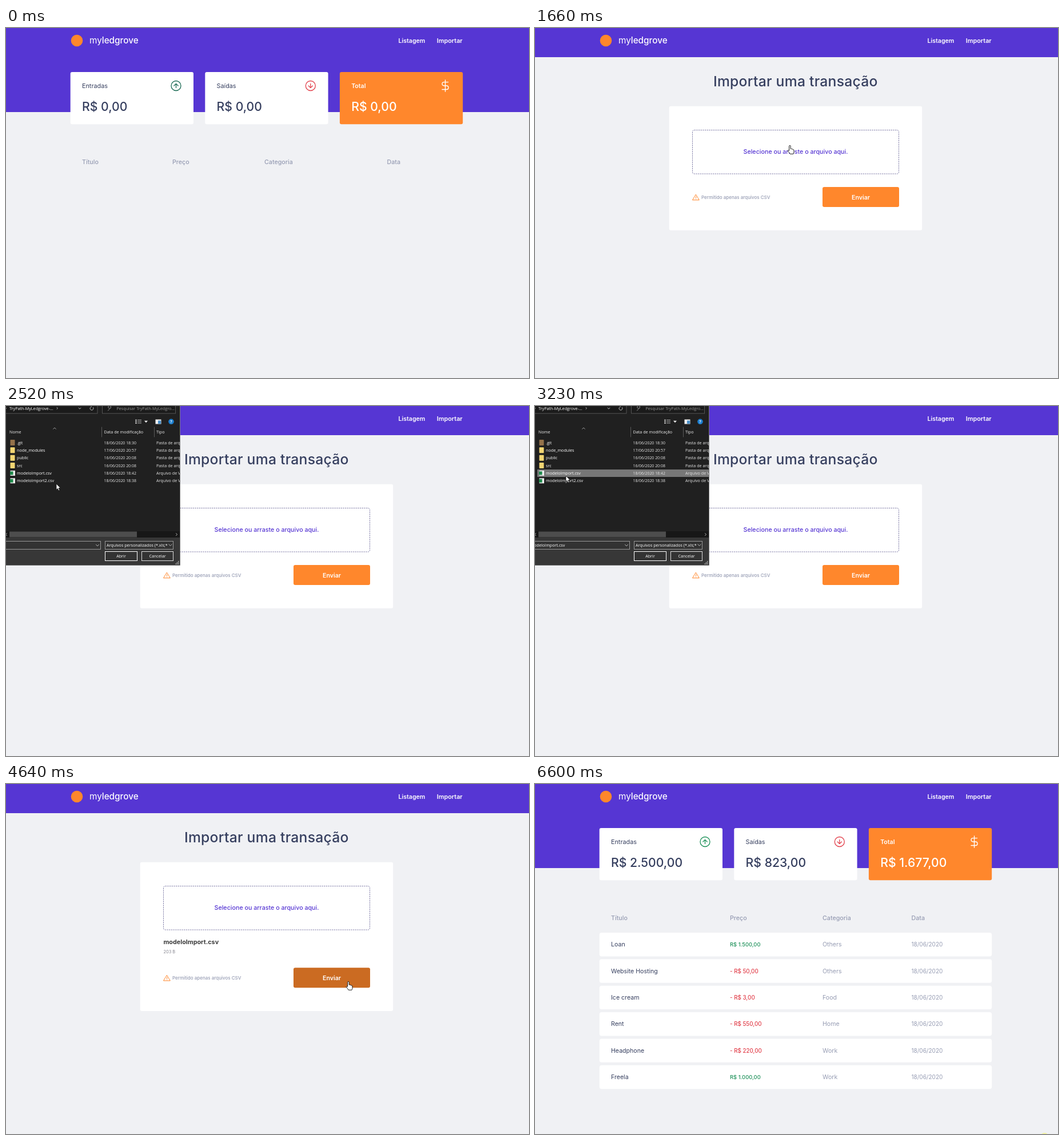
Recreate the animation shown at these times as an HTML page. Size 915 by 612 pixels, loop 6670 ms.

```html
<!DOCTYPE html>
<html lang="pt-BR">
<head>
<meta charset="utf-8">
<title>Importar transações</title>
<style>
  html, body { margin: 0; width: 100%; height: 100%; overflow: hidden; background: #f0f1f4; }
  svg { display: block; width: 915px; height: 612px; }
  text { font-family: Inter, "Open Sans", sans-serif; font-size: 10.6px; white-space: pre; }
  .win text { font-family: "Open Sans", "Noto Sans", sans-serif; font-size: 7.2px; }
  .line { fill: none; stroke-linecap: round; stroke-linejoin: round; }
</style>
</head>
<body>
<svg id="stage" viewBox="0 0 915 612"></svg>
<script>
const LOOP = 6670;
const C = {
  purple: '#5636d3', orange: '#ff872c', ink: '#363f5f', mute: '#969cb3',
  green: '#1d9159', deep: '#1c6b55', red: '#e2414c', white: '#fff'
};

const text = (x, y, s, fill, attrs = '') => `<text x="${x}" y="${y}" fill="${fill}" ${attrs}>${s}</text>`;
const rect = (x, y, w, h, fill, attrs = '') =>
  `<rect x="${x}" y="${y}" width="${w}" height="${h}" fill="${fill}" ${attrs}/>`;
const line = (d, stroke, width = 1, attrs = '') =>
  `<path class="line" d="${d}" stroke="${stroke}" stroke-width="${width}" ${attrs}/>`;
const group = (id, body, attrs = '') => `<g id="${id}" ${attrs}>${body}</g>`;
const size = (px, weight = 400) => `style="font-size:${px}px;font-weight:${weight}"`;
const medium = size(10.7, 500);
const strong = size(10.6, 600);

// Shared header
const header = () =>
  `<circle cx="124" cy="22" r="10.3" fill="${C.orange}"/>` +
  text(146, 26.5, 'my<tspan font-weight="500">ledgrove</tspan>', C.white, size(15.3)) +
  text(686.5, 26, 'Listagem', C.white, strong) +
  text(753.8, 26, 'Importar', C.white, 'id="link" ' + size(10.8, 600));

// Listing page
function arrowIcon(x, color, down) {
  const turn = down ? ' rotate(180)' : '';
  return `<g transform="translate(${x} 101)${turn}">` +
    `<circle r="8.5" fill="none" stroke="${color}" stroke-width="1.3"/>` +
    line('M0 3.6V-3.6M-3.6 0L0 -3.6L3.6 0', color, 1.3) + '</g>';
}

function listing(id, totals, columns, rows, up) {
  const labels = ['Entradas', 'Saídas', 'Total'];
  let out = rect(0, 51, 915, 96, C.purple);
  labels.forEach((label, i) => {
    const x = 112.7 + i * 235.6, last = i === 2, ink = last ? C.white : C.ink;
    out += rect(x, 77, 215.3, 91.3, last ? C.orange : C.white, 'rx="3"') +
      text(x + 20.3, 105, label, ink, last ? strong : size(10.8)) +
      text(x + 20.3, 145, 'R$ ' + totals[i], ink, size(21.2, 500));
  });
  out += arrowIcon(297.5, up, false) + arrowIcon(532.8, C.red, true) +
    line('M12 1V23M17.5 5H9.5a3.5 3.5 0 0 0 0 7h5a3.5 3.5 0 0 1 0 7H6', C.white, 1.5,
      'transform="translate(757.5 90) scale(.92)"');
  ['Título', 'Preço', 'Categoria', 'Data'].forEach((s, i) => {
    out += text(columns[i], 238, s, C.mute, medium);
  });
  rows.forEach(([name, price, kind], i) => {
    const y = 260 + i * 46.35, base = y + 24.4, cost = price[0] === '-';
    out += rect(112.7, y, 686.5, 41.4, C.white, 'rx="4"') +
      text(columns[0], base, name, C.ink) +
      text(columns[1], base, price, cost ? C.red : C.green, size(cost ? 9.8 : 9.4, 500)) +
      text(columns[2], base, kind, C.mute) +
      text(columns[3], base, '18/06/2020', C.mute, size(10));
  });
  return group(id, out);
}

const entries = [
  ['Loan', 'R$ 1.500,00', 'Others'],
  ['Website Hosting', '- R$ 50,00', 'Others'],
  ['Ice cream', '- R$ 3,00', 'Food'],
  ['Rent', '- R$ 550,00', 'Home'],
  ['Headphone', '- R$ 220,00', 'Work'],
  ['Freela', 'R$ 1.000,00', 'Work']
];

// Import page
const importPage = () => group('import',
  text(455.8, 102, 'Importar uma transação', C.ink,
    'text-anchor="middle" style="font-size:24.7px;font-weight:500;letter-spacing:.01em"') +
  rect(234.7, 136.7, 442.5, 217, C.white, 'id="card" rx="3"') +
  rect(275.5, 178.5, 361, 76.5, 'none', 'rx="3" stroke="#807da8" stroke-dasharray="2.4 1.3"') +
  text(456, 220, 'Selecione ou arraste o arquivo aqui.', C.purple, 'text-anchor="middle" ' + medium) +
  group('file',
    text(275.5, 280, 'modeloImport.csv', '#3d3d3d', size(10.8, 700)) +
    text(275.5, 295.5, '203 B', '#85858f', size(7.4))) +
  group('footer',
    group('alert',
      line('M281.6 291.4L287.3 300.8H275.9Z', C.orange) + line('M281.6 294.8V297.4M281.6 299V299.1', C.orange)) +
    text(291, 299, 'Permitido apenas arquivos CSV', C.mute, 'id="note" ' + size(8, 500)) +
    rect(503, 278, 134, 35, C.orange, 'id="send" rx="3"') +
    text(570, 299.8, 'Enviar', C.white, 'text-anchor="middle" ' + strong)));

// File dialog
const panel = '#373737';
const slots = [[-5, 236, 171, 15], [173, 236, 120, 15], [173, 254, 57, 17], [237, 254, 56, 17]];

const blankDialog = () => group('blank',
  rect(0, 0, 304, 278, C.white) +
  rect(6, 219, 223, 11, '#4d4d4d') + rect(229, 219, 64, 11, '#171717') +
  rect(0, 230, 304, 48, panel) + rect(293, 267, 11, 11, C.white) +
  slots.map(s => rect(...s, C.white)).join('') +
  line('M304.5 0V278.5H0', '#888'));

function fileRow(name, date, type, i) {
  const y = 64 + i * 13.35, sheet = i > 3;
  const icon = sheet
    ? rect(7.5, y - 4.5, 8.5, 9, '#eee') + rect(7, y - 3, 5.5, 6, '#1f8a4c')
    : rect(7.5, y - 5, 8, 10, i ? '#f3d673' : '#94724a', 'rx=".8"');
  return icon + text(19, y + 2.6, name, '#fff') +
    text(171.5, y + 2.6, date, '#e4e4e4', 'style="font-size:6.95px"') + text(263, y + 2.6, type, '#e4e4e4');
}

const slotBox = ([x, y, w, h], i) =>
  rect(x + .5, y + .5, w - 1, h - 1, '#333', `stroke="${['#999', '#999', '#fff', '#ddd'][i]}"`);

const dialog = () => group('dialog',
  rect(0, 0, 304, 278, '#202020') +
  rect(-5, -8, 165, 21, '#1b1b1b', 'stroke="#555"') + rect(168.5, -8, 128, 21, '#1b1b1b', 'stroke="#555"') +
  group('place',
    line('M-1 2.5l1.5 1.5l-1.5 1.5M89 2.5l1.5 1.5l-1.5 1.5M127 3.2l2 2l2-2M152.6 2.6a3 3 0 1 1-3-1.4', '#ccc', .9) +
    text(6, 6.5, 'TryPath-MyLedgrove-...', '#fff') +
    text(193.5, 6.5, 'Pesquisar TryPath-MyLedgro...', '#999') +
    line('M183 3.6a2.4 2.4 0 1 0-.1.1M181 5.5L178.5 8', '#aaa', .9)) +
  [0, 1, 2].map(i => rect(226.5, 23.6 + i * 2.7, 2, 2, '#ddd') + rect(230, 24 + i * 2.7, 7, 1, '#aaa')).join('') +
  '<path d="M242 25.8h6l-3 3.4z" fill="#eee"/>' +
  rect(261.5, 23.5, 10, 8, '#eee') + rect(266, 25.5, 5, 5.5, '#4a90c8') +
  '<circle cx="289" cy="27.3" r="4.8" fill="#1c7fd0"/>' +
  text(289, 30, '?', C.white, 'text-anchor="middle" font-weight="700"') +
  line('M167.5 37V54M259.5 37V54', '#5a5a5a') + line('M82.6 40.2L85 38L87.4 40.2', '#bbb', .8) +
  text(6, 48, 'Nome', '#eee') + text(171.5, 48, 'Data de modificação', '#eee') + text(263, 48, 'Tipo', '#eee') +
  rect(4, 111, 300, 13, '#777', 'id="pick"') +
  [
    ['.git', '18/06/2020 18:30'], ['node_modules', '17/06/2020 20:57'],
    ['public', '16/06/2020 20:08'], ['src', '16/06/2020 20:08'],
    ['modeloImport.csv', '18/06/2020 18:42'], ['modeloImport2.csv', '18/06/2020 18:38']
  ].map(([n, d], i) => fileRow(n, d, i > 3 ? 'Arquivo de Valores' : 'Pasta de arquivos', i)).join('') +
  rect(0, 219, 304, 11, '#171717') + rect(6, 219.5, 223, 10, '#4d4d4d') +
  line('M1.5 222.6l-2 2l2 2M297.5 222.6l2 2l-2 2', '#ccc', .9) +
  rect(0, 230, 304, 48, panel) +
  slots.map(slotBox).join('') +
  line('M157.5 242.4l2.5 2.5l2.5-2.5M285 242l2.5 2.5l2.5-2.5', '#ccc', .9) +
  group('chosen', text(-8.5, 246.2, 'modeloImport.csv', '#fff')) +
  text(176, 246, 'Arquivos personalizados (*.xls;*', '#fff') +
  text(201.5, 265.2, 'Abrir', '#fff', 'text-anchor="middle"') +
  text(265, 265.2, 'Cancelar', '#fff', 'text-anchor="middle"') +
  [[0, 0], [2.2, 0], [0, -2.2], [2.2, -2.2], [2.2, -4.4], [-2.2, 0]]
    .map(([x, y]) => rect(298.8 + x, 275.5 + y, 1.3, 1.3, '#ddd')).join('') +
  line('M304.5 0V278.5H0', '#777'));

const pointer = () => group('cursor',
  '<path id="arrow" d="M0 0V10.4L2.4 8.3L4 12L5.8 11.2L4.2 7.6H7.4Z" fill="#fff" stroke="#111" stroke-width=".8"/>' +
  '<path id="hand" transform="translate(0 .4) scale(1.06)" d="M-1.3 8.4V1.2a1.2 1.2 0 0 1 2.4 0V5.4q1.9-.5 2.2.6q1.7-.3 1.9.7q1.4 0 1.4 1.4v2.6q0 1.6-1 3.3H.2q-1.2-2.3-3.8-5.2q.6-1.6 2.3-.4z" fill="#fff" stroke="#111" stroke-width=".9"/>');

document.getElementById('stage').innerHTML =
  '<clipPath id="edge"><rect width="305" height="279"/></clipPath>' +
  rect(0, 0, 915, 612, '#f0f1f4') + rect(0, 0, 915, 51, C.purple) + header() +
  listing('empty', ['0,00', '0,00', '0,00'], [133, 291, 452, 666.5], [], C.deep) +
  listing('full', ['2.500,00', '823,00', '1.677,00'], [133, 341, 503, 658.5], entries, C.green) +
  importPage() +
  `<g class="win" clip-path="url(#edge)">${blankDialog()}${dialog()}</g>` +
  pointer() +
  '<ellipse id="glow" cx="891.5" cy="614" rx="6" ry="4" fill="#f3f3a0"/>';

// Pointer moves: start, end, steps, from x y, to x y
const moves = [
  [70, 560, 8, 853, 461, 780, 20],
  [710, 710, 1, 783, 20, 783, 20],
  [880, 1500, 9, 784, 27, 444, 229],
  [1590, 1660, 2, 446, 217, 446, 205],
  [1810, 2200, 6, 452, 206, 300, 185],
  [2280, 2440, 3, 225, 168, 110, 142],
  [2520, 2840, 5, 88, 136, 54, 122],
  [3400, 4010, 9, 54, 122, 602, 351],
  [4160, 4160, 1, 606, 352, 606, 352],
  [4330, 4640, 5, 604, 350, 599, 345],
  [4940, 5350, 6, 625, 370, 845, 630]
];

const ease = p => p * p * (3 - 2 * p);
const within = (t, a, b) => t >= a && t < b;

function pointerAt(t) {
  let move = null;
  for (const m of moves) if (t >= m[0]) move = m;
  if (!move) return [-50, -50];
  const [a, b, n, x0, y0, x1, y1] = move;
  const gap = n > 1 ? (b - a) / (n - 1) : 1;
  const i = Math.min(n - 1, Math.floor((t - a + 4) / gap));
  const p = n > 1 ? ease(i / (n - 1)) : 1;
  return [x0 + (x1 - x0) * p, y0 + (y1 - y0) * p];
}

const el = {};
document.querySelectorAll('#stage [id]').forEach(n => { el[n.id] = n; });
const show = (id, on) => { el[id].style.display = on ? '' : 'none'; };
const mix = (a, b, p) => `rgb(${a.map((v, i) => Math.round(v + (b[i] - v) * p)).join()})`;
const ramp = (t, a, b) => Math.min(1, Math.max(0, (t - a) / (b - a)));

function render(t) {
  show('empty', t < 880 || within(t, 4710, 4800));
  show('full', t >= 4800);
  show('import', within(t, 880, 4710));
  show('blank', within(t, 2120, 2280));
  show('dialog', within(t, 2280, 3400));
  show('place', t >= 2520);
  show('pick', t >= 2680);
  show('chosen', t >= 3160);
  el.pick.setAttribute('fill', t < 3160 ? '#4d4d4d' : '#777');

  const added = t >= 3400;
  show('file', added);
  show('alert', t >= 960);
  el.note.setAttribute('x', t < 960 ? 278.3 : 291);
  el.card.setAttribute('height', added ? 260.3 : 217);
  el.footer.setAttribute('transform', `translate(0 ${added ? 43.2 : 0})`);
  el.send.setAttribute('fill', mix([255, 135, 44], [203, 107, 34], ramp(t, 3850, 4010)));
  el.link.setAttribute('opacity', t < 880 ? 1 - .4 * ramp(t, 400, 560) : 1);

  const hand = within(t, 480, 950) || within(t, 1260, 1960) || within(t, 3850, 4710);
  show('hand', hand);
  show('arrow', !hand);
  el.cursor.setAttribute('transform', `translate(${pointerAt(t).join(' ')})`);
  show('glow', t >= 6600);
}

const start = performance.now();
function tick() {
  render((performance.now() - start) % LOOP);
  requestAnimationFrame(tick);
}
tick();
</script>
</body>
</html>
```
